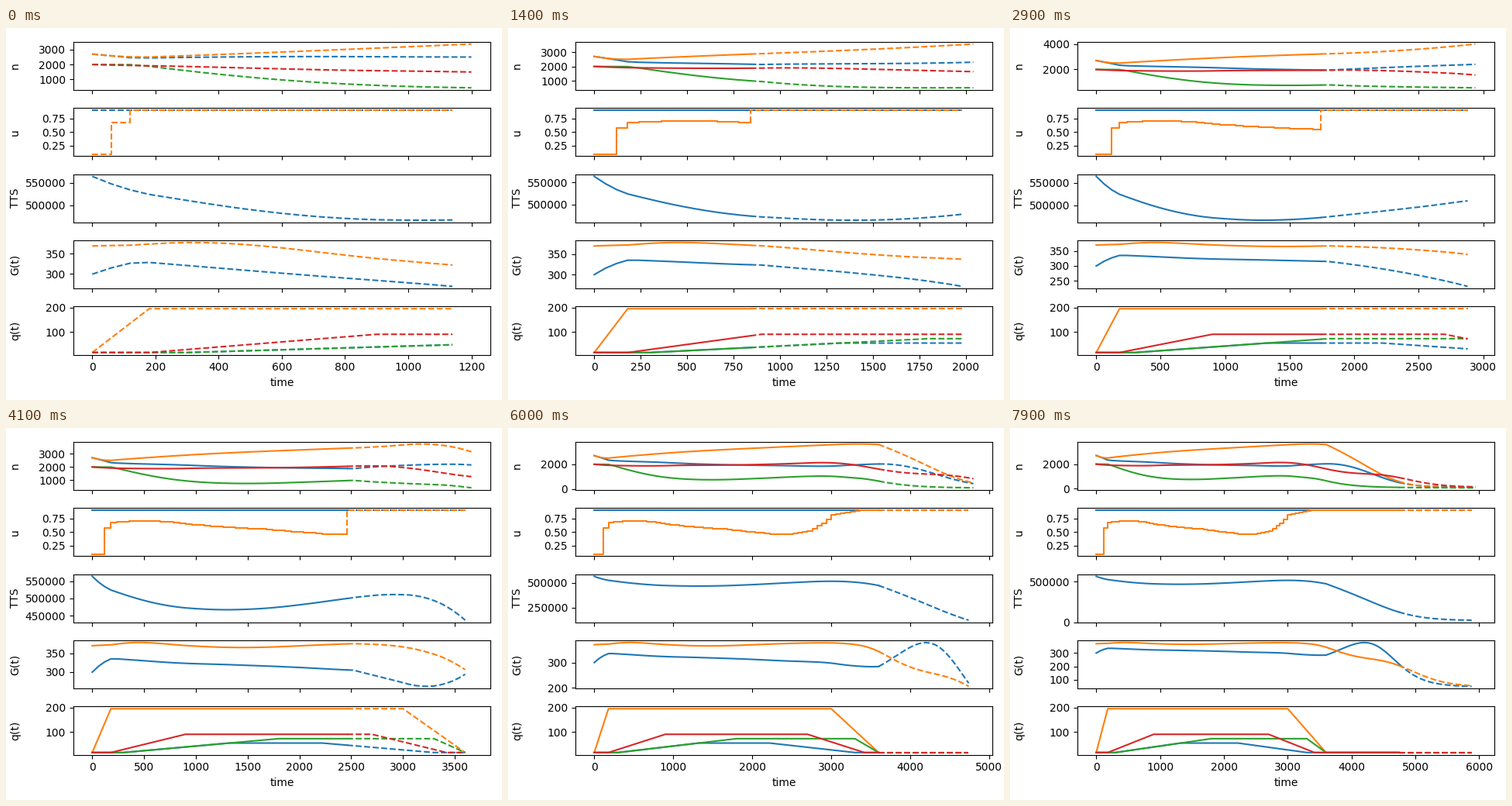
Recreate the animation shown at these times as a matplotlib script. Size 640 by 480 pixels, loop 8000 ms.

```python
import numpy as np
import matplotlib.pyplot as plt
from matplotlib.animation import FuncAnimation

DT = 60          # seconds per control step
HORIZON = 20     # predicted steps
STEPS = 80
U_MIN, U_MAX = 0.1, 0.9
Q_BASE = 15

time = DT * np.arange(STEPS + HORIZON + 1)


def trapezoid(rise, top, fall, end, peak):
    """Demand in vehicles per step: base, ramp up, hold, ramp down."""
    return np.interp(time, [rise, top, fall, end],
                     [Q_BASE, peak, peak, Q_BASE])


demand = np.array([trapezoid(300, 1320, 2220, 3300, 54),
                   trapezoid(0, 180, 3000, 3600, 195),
                   trapezoid(300, 1800, 3300, 3600, 72),
                   trapezoid(180, 900, 2700, 3420, 90)])

# The real cross-region inflow fades late, then stops at the ramp's end
inflow = demand.copy()
fading = (time > 3000) & (time < 3600)
inflow[1, fading] = np.interp(time[fading], [3000, 3600], [195, 142])

# Applied gate control from region 2 to region 1, as key points
GATE = [(120, U_MIN), (180, 0.575), (240, 0.68), (480, 0.705), (660, 0.705),
        (1200, 0.605), (1740, 0.548), (2280, 0.465), (2520, 0.46),
        (2760, 0.52), (2940, 0.66), (3060, 0.815), (3420, U_MAX)]
gate = np.interp(time, *zip(*GATE))


def outflow(n):
    """Trip completion per step for an accumulation (cubic MFD)."""
    return (1.4877e-7 * n**3 - 2.9815e-3 * n**2 + 15.0912 * n) * DT / 3600


def regions(n):
    return np.array([n[0] + n[1], n[2] + n[3]])


def simulate(start, controls, q):
    """Accumulations n11, n12, n21, n22 over the steps, one row each."""
    states = [np.array(start, float)]
    for u21, q_now in zip(controls, q.T):
        n = states[-1]
        total = regions(n)
        m = n * np.repeat(outflow(total) / total, 2)
        out12, out21 = U_MAX * m[1], u21 * m[2]
        flow = np.array([out21 - m[0], -out12, -out21, out12 - m[3]])
        states.append(n + q_now + flow)
    return np.array(states).T


history = simulate([2700, 2700, 2000, 2000], gate[:STEPS], inflow)


def plan(k):
    """Keep the current control, then open as fast as the start-up allows."""
    u = np.interp(time[k:k + HORIZON], [60, 120, 180], [U_MIN, 0.68, U_MAX])
    u[0] = gate[k]
    return u


def series(n, u, k):
    """Rows for the five panels; n may be one sample longer than u."""
    size = len(u)
    m = n[:, :size]
    return [n, np.array([np.full(size, U_MAX), u]), DT * m.sum(0)[None],
            outflow(regions(m)), demand[:, k:k + size]]


fig, axes = plt.subplots(5, 1, sharex=True, figsize=(6.4, 4.8), dpi=100)
fig.subplots_adjust(left=86.8 / 640, right=625 / 640, top=462.2 / 480,
                    bottom=58.4 / 480, hspace=23.2 / 62.2)

lines = []
for ax, label, count in zip(axes, ["n", "u", "TTS", "G(t)", "q(t)"],
                            [4, 2, 1, 2, 4]):
    ax.set_ylabel(label)
    style = "steps-pre" if label == "u" else "default"
    lines.append([[ax.plot([], [], ls, color=f"C{i}", drawstyle=style)[0]
                   for i in range(count)] for ls in ("-", "--")])
axes[-1].set_xlabel("time")
fig.align_ylabels(axes)


def update(k):
    past = series(history[:, :k + 1], gate[:k + 1], 0)
    u = plan(k)
    ahead = simulate(history[:, k], u, demand[:, k:])
    future = series(ahead, u, k)
    for (solid, dashed), old, new in zip(lines, past, future):
        for line, y in zip(solid, old):
            line.set_data(time[:len(y)], y)
        for line, y in zip(dashed, new):
            line.set_data(time[k:k + len(y)], y)
    for ax in axes:
        ax.relim()
    for ax in axes:
        ax.autoscale_view()
    return []


anim = FuncAnimation(fig, update, frames=STEPS, init_func=lambda: update(0),
                     interval=100, repeat=True, repeat_delay=0, blit=False)
plt.show()
```
